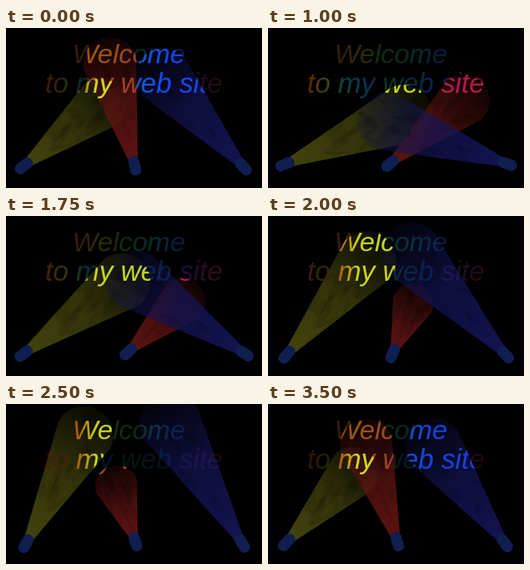
These frames come from a looping animation (320 by 200 pixels, 3750 ms). An HTML page with a canvas:

```html
<!DOCTYPE html>
<html lang="en">
<head>
<meta charset="utf-8">
<title>Welcome</title>
<style>
html, body { margin: 0; width: 100%; height: 100%; overflow: hidden; background: #000; }
canvas { display: block; }
</style>
</head>
<body>
<canvas id="stage" width="320" height="200"></canvas>
<script>
const ctx = document.getElementById('stage').getContext('2d');
const STEP = 250, STEPS = 15, TURN = 2 * Math.PI;
const wave = t => Math.cos(TURN * t / STEPS);

// Each lamp turns on a fixed pivot while its spot follows a closed curve through evenly timed points
const lights = [
  { rgb: '70,70,14', pivot: [29, 167], power: () => .95,
    spots: [[118, 96], [165, 106], [160, 103], [107, 38], [92, 62]],
    lit: [[76, '#44200a'], [90, '#b0600c'], [112, '#d0dc1c']] },
  { rgb: '96,20,18', pivot: [159, 164], power: () => .75,
    spots: [[130, 45], [228, 82], [247, 102], [150, 110], [134, 80]],
    lit: [[110, '#c06414'], [225, '#dc1c50']] },
  { rgb: '20,20,84', pivot: [291, 167], power: t => Math.max(.1, wave(t)),
    spots: [[197, 61], [155, 112], [150, 106], [194, 24], [220, 46]],
    lit: [[150, '#1060c8'], [200, '#1446f0']] }
];

function rainbow(stops) {
  const [first, last] = [stops[0][0], stops[stops.length - 1][0]];
  const g = ctx.createLinearGradient(first, 0, last, 0);
  for (const [x, color] of stops) g.addColorStop((x - first) / (last - first), color);
  return g;
}

const lines = [
  { text: 'Welcome', x: 83, y: 44, size: 34, glow: () => .85,
    dim: rainbow([[85, '#40200a'], [120, '#34340a'], [150, '#0a3414'], [185, '#073438'], [223, '#0c1c48']]) },
  { text: 'to my web site', x: 49, y: 81, size: 34.7, glow: t => .65 + .3 * wave(t - 4),
    dim: rainbow([[50, '#642808'], [76, '#404810'], [95, '#0c4444'], [130, '#0c3058'],
      [150, '#0a3a28'], [205, '#0c2454'], [230, '#301048'], [270, '#40101c']]) }
];
for (const light of lights) light.fill = rainbow(light.lit);

function random(seed) {
  return () => {
    const v = Math.sin(seed++ * 127.1) * 43758.5453;
    return v - Math.floor(v);
  };
}

// Closed Catmull-Rom curve
function spotAt(points, t) {
  const n = points.length, s = t / STEPS * n, i = Math.floor(s), u = s - i;
  return [0, 1].map(axis => {
    const [p, a, b, q] = [-1, 0, 1, 2].map(k => points[(i + k + n) % n][axis]);
    return a + u / 2 * (b - p + u * (2 * p - 5 * a + 4 * b - q + u * (3 * (a - b) + q - p)));
  });
}

function placeBeam(light, t) {
  const [x, y] = light.pivot, [tx, ty] = spotAt(light.spots, t);
  const length = Math.hypot(tx - x, ty - y), radius = 19 + .12 * length;
  const path = new Path2D();
  path.moveTo(0, 6);
  path.lineTo(0, -6);
  path.arc(length, 0, radius, -TURN / 4, TURN / 4);
  path.closePath();
  return { light, x, y, length, radius, path, angle: Math.atan2(ty - y, tx - x) };
}

function inBeamSpace(beam, draw) {
  ctx.save();
  ctx.translate(beam.x, beam.y);
  ctx.rotate(beam.angle);
  draw();
  ctx.restore();
}

function drawBeam(beam, index) {
  const { length, radius, path, light } = beam;
  inBeamSpace(beam, () => {
    const g = ctx.createLinearGradient(0, 0, length + radius, 0);
    [.95, .72, .15].forEach((alpha, i) => g.addColorStop(i / 2, `rgba(${light.rgb},${alpha})`));
    ctx.fillStyle = g;
    ctx.fill(path);
    ctx.clip(path);
    // Smoky streaks
    const rnd = random(index * 100 + 7);
    ctx.fillStyle = 'rgba(0,0,0,.1)';
    for (let i = 0; i < 24; i++) {
      ctx.beginPath();
      ctx.ellipse(length * (.3 + rnd()), (rnd() - .5) * radius * 2, 6 + rnd() * 14, 2 + rnd() * 4, rnd() - .5, 0, TURN);
      ctx.fill();
    }
  });
}

function drawLamp(beam) {
  inBeamSpace(beam, () => {
    ctx.strokeStyle = '#0e1f50';
    ctx.lineWidth = 14;
    ctx.lineCap = 'round';
    ctx.beginPath();
    ctx.moveTo(-14, 0);
    ctx.lineTo(-3, 0);
    ctx.stroke();
  });
}

function drawLine({ text, x, y, size }) {
  ctx.font = `italic ${size}px "Liberation Sans", Arial, sans-serif`;
  ctx.fillText(text, x, y);
}

function lightText(beam, t) {
  ctx.save();
  inBeamSpace(beam, () => {});
  const clip = new Path2D();
  clip.addPath(beam.path, new DOMMatrix().translate(beam.x, beam.y).rotate(beam.angle * 360 / TURN));
  ctx.clip(clip);
  ctx.globalAlpha = beam.light.power(t);
  ctx.fillStyle = beam.light.fill;
  lines.forEach(drawLine);
  ctx.restore();
}

function render(now) {
  const t = Math.floor(now / STEP) % STEPS;
  const beams = lights.map(light => placeBeam(light, t));
  ctx.fillStyle = '#000';
  ctx.fillRect(0, 0, 320, 200);
  beams.forEach(drawBeam);
  beams.forEach(drawLamp);

  for (const line of lines) {
    ctx.globalAlpha = line.glow(t);
    ctx.fillStyle = line.dim;
    drawLine(line);
  }
  ctx.globalAlpha = 1;
  for (const beam of beams.reverse()) lightText(beam, t);
}

const start = performance.now();
function tick() {
  render(performance.now() - start);
  requestAnimationFrame(tick);
}
tick();
</script>
</body>
</html>
```
